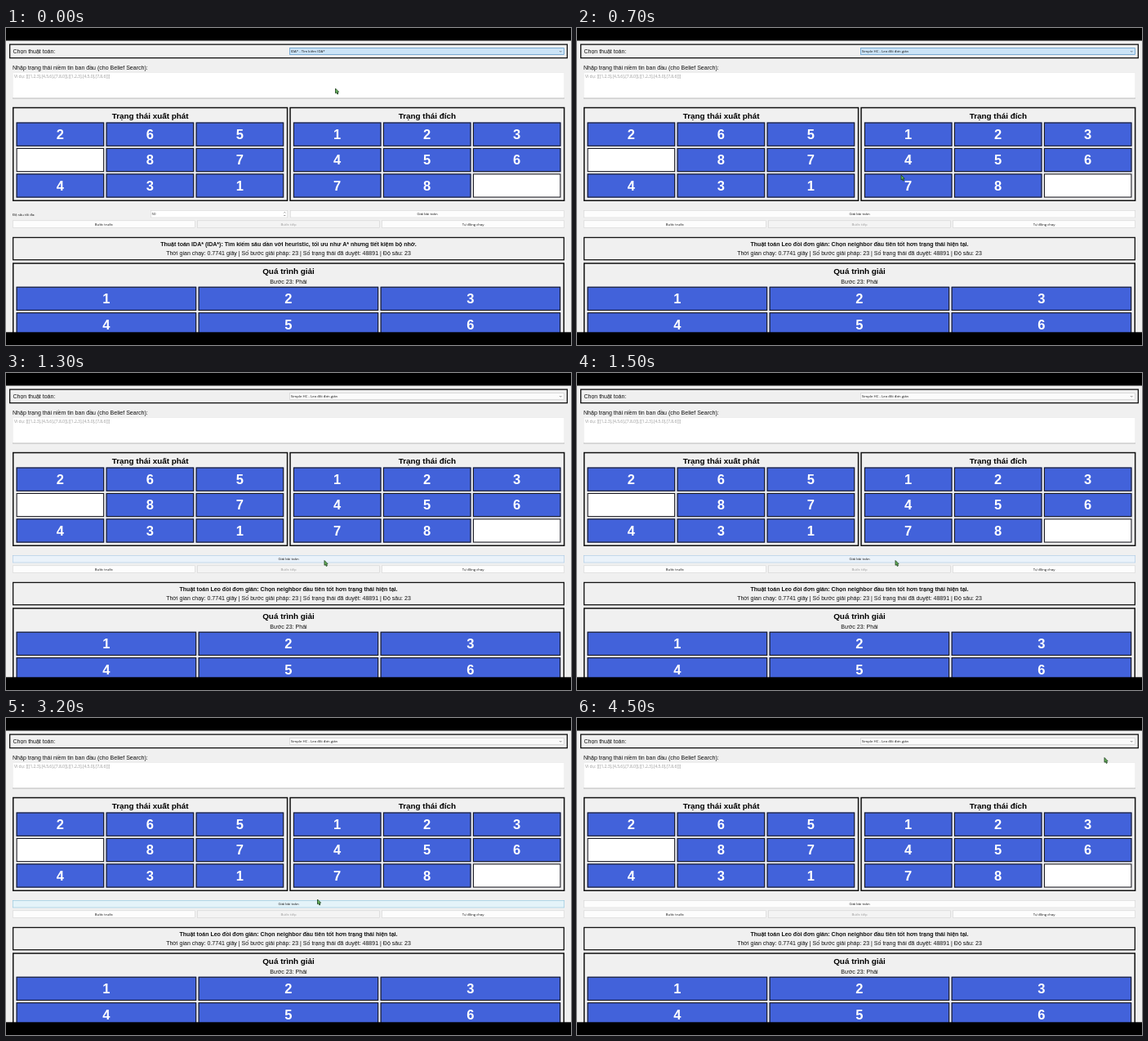
These frames come from a looping animation (692 px wide and 388 px high, 4.6 s). An HTML page with a canvas:

```html
<!DOCTYPE html>
<html lang="vi">
<head>
<meta charset="utf-8">
<style>
html, body { margin: 0; width: 100%; height: 100%; overflow: hidden; background: #000; }
canvas { display: block; width: 692px; height: 388px; }
</style>
</head>
<body>
<canvas id="stage"></canvas>
<script>
const LOOP = 4600, STEP = 100;
const W = 692, H = 388;
const BLUE = '#4262da', INK = '#111', PANEL = '#f0f0f0';
const SANS = '"Liberation Sans", Arial, sans-serif';
const UI = '"Open Sans", "Noto Sans", sans-serif';

const canvas = document.getElementById('stage');
const ctx = canvas.getContext('2d');
const scale = window.devicePixelRatio || 1;
canvas.width = W * scale;
canvas.height = H * scale;

// Pointer path: time, x, y
const path = [
  [0, 403.5, 74], [100, 407.5, 77], [500, 407.5, 77], [600, 405, 100], [700, 397, 180],
  [800, 390, 229.5], [1800, 390, 229.5], [2300, 373.5, 227.8], [2900, 373.5, 227.8],
  [3200, 381.5, 222], [3300, 392, 211], [3400, 410, 191], [3500, 433, 169],
  [3800, 535, 108], [4100, 622, 61], [4500, 646, 48.5], [4600, 646, 48.5]
];

function pointerAt(t) {
  const i = Math.max(1, path.findIndex(p => p[0] >= t));
  const [t0, x0, y0] = path[i - 1], [t1, x1, y1] = path[i];
  const k = (t - t0) / (t1 - t0);
  return [x0 + (x1 - x0) * k, y0 + (y1 - y0) * k];
}

function box(x, y, right, bottom, fill, stroke, line = 1) {
  ctx.fillStyle = fill;
  ctx.fillRect(x, y, right - x, bottom - y);
  if (!stroke) return;
  ctx.strokeStyle = stroke;
  ctx.lineWidth = line;
  ctx.strokeRect(x + line / 2, y + line / 2, right - x - line, bottom - y - line);
}

function text(str, x, y, font, color = INK, align = 'left') {
  ctx.font = font;
  ctx.fillStyle = color;
  ctx.textAlign = align;
  ctx.fillText(str, x, y);
}

const label = (str, x, y, align) => text(str, x, y, `7.04px ${SANS}`, INK, align);
const title = (str, x, y) => text(str, x, y, `bold 9.9px ${SANS}`, '#000', 'center');
const small = (str, x, y, color, align) => text(str, x, y, `4.3px ${UI}`, color, align);

function tiles(values, left, top, width, pitchX, pitchY) {
  [...values].forEach((v, i) => {
    const x = left + i % 3 * pitchX, y = top + Math.floor(i / 3) * pitchY;
    box(x, y, x + width, y + 29.3, v === '0' ? '#fff' : BLUE, '#1c1c24', 1.1);
    if (v !== '0') text(v, x + width / 2, y + 20.4, `bold 16.5px ${SANS}`, '#fff', 'center');
  });
}

function board(name, values, left, right) {
  box(left, 96.8, right, 212, PANEL, INK, 1.5);
  title(name, (left + right) / 2, 110.7);
  tiles(values, left + 4.6, 115.5, 107.6, 110, 31.4);
}

function button(str, left, right, y, { fill = '#fdfdfd', edge = '#d2d2d2', color = INK } = {}) {
  box(left, y, right, y + 9.3, fill, edge, 0.6);
  small(str, (left + right) / 2, y + 6.2, color, 'center');
}

function solveStyle(t) {
  if (t >= 800 && t < 1300) return { fill: '#e4f0f9', edge: '#86b4d6' };
  if (t >= 1300 && t < 1700) return { fill: '#eaf2fa', edge: '#a9c8e2' };
  if (t >= 3000 && t < 3300) return { fill: '#e4f3f9', edge: '#8fc3da' };
  return {};
}

function chevron(x, y, w, h) {
  ctx.beginPath();
  ctx.moveTo(x - w, y);
  ctx.lineTo(x, y + h);
  ctx.lineTo(x + w, y);
  ctx.strokeStyle = '#444';
  ctx.lineWidth = 0.6;
  ctx.stroke();
}

function chooser(t, deepening) {
  box(4, 19.5, 688, 37.3, PANEL, INK, 1.3);
  label('Chọn thuật toán:', 8.4, 31.3);
  const focused = t < 800;
  box(347, 24.3, 683.7, 32.8, focused ? '#cce4f7' : '#fbfbfb', focused ? '#5795c6' : '#cfcfcf', 0.7);
  small(deepening ? 'IDA* - Tìm kiếm IDA*' : 'Simple HC - Leo đồi đơn giản', 348.8, 30.2);
  chevron(679.3, 28, 1.3, 1.3);
}

function beliefInput() {
  label('Nhập trạng thái niềm tin ban đầu (cho Belief Search):', 8, 50.7);
  box(8, 54.5, 684, 86.3, '#fff', '#e6e6e6', 0.5);
  box(8, 85.7, 684, 86.4, '#a0a0a0');
  text('Ví dụ: [[[1,2,3],[4,5,6],[7,8,0]],[[1,2,3],[4,5,0],[7,8,6]]]',
    10, 61.2, `5.05px ${UI}`, '#999');
}

function controls(t, deepening) {
  if (deepening) {
    small('Độ sâu tối đa:', 8, 229.6);
    box(177, 223, 345, 232.3, '#fff', '#d2d2d2', 0.6);
    small('50', 178.6, 229.4);
    chevron(341.3, 226.4, 1, -1);
    chevron(341.3, 229, 1, 1);
  }
  button('Giải bài toán', deepening ? 348 : 8, 684, 223, solveStyle(t));
  button('Bước trước', 8, 231.7, 235.5);
  button('Bước tiếp', 234.3, 457.7, 235.5, { fill: '#f4f4f4', color: '#999' });
  button('Tự động chạy', 460.3, 684, 235.5);
}

function results(deepening) {
  box(8, 255.8, 684, 284.4, PANEL, INK, 1.3);
  const summary = deepening
    ? 'Thuật toán IDA* (IDA*): Tìm kiếm sâu dần với heuristic, tối ưu như A* nhưng tiết kiệm bộ nhớ.'
    : 'Thuật toán Leo đồi đơn giản: Chọn neighbor đầu tiên tốt hơn trạng thái hiện tại.';
  text(summary, 346, 267.2, `bold 7.04px ${SANS}`, INK, 'center');
  label('Thời gian chạy: 0.7741 giây | Số bước giải pháp: 23 | Số trạng thái đã duyệt: 48891 | Độ sâu: 23',
    346, 278.4, 'center');

  box(8, 287.3, 684, 400, PANEL, INK, 1.5);
  title('Quá trình giải', 346, 300.9);
  label('Bước 23: Phải', 346, 313.2, 'center');
  tiles('123456', 12.6, 316.7, 220.6, 223, 31.4);
}

function pointer(t) {
  const [x, y] = pointerAt(t);
  ctx.save();
  ctx.translate(x, y);
  if (t >= 100 && t < 700) {
    ctx.fillStyle = '#111';
    ctx.fillRect(0.1, 0.3, 0.9, 6);
    ctx.fillRect(-1.2, 0, 3.5, 0.7);
    ctx.fillRect(-1.2, 6, 3.5, 0.7);
  } else {
    ctx.beginPath();
    [[0, 0], [0, 5.8], [1.3, 4.8], [2.3, 7], [3.4, 6.5], [2.5, 4.4], [4.1, 4.2]]
      .forEach(p => ctx.lineTo(...p));
    ctx.closePath();
    ctx.fillStyle = '#69b95c';
    ctx.fill();
    ctx.strokeStyle = '#173b18';
    ctx.lineWidth = 0.8;
    ctx.stroke();
  }
  ctx.restore();
}

function draw(t) {
  const deepening = t < 200;
  ctx.setTransform(scale, 0, 0, scale, 0, 0);
  box(0, 0, W, H, PANEL);
  chooser(t, deepening);
  beliefInput();
  board('Trạng thái xuất phát', '265087431', 8, 345.3);
  board('Trạng thái đích', '123456780', 347.3, 684.4);
  controls(t, deepening);
  results(deepening);
  pointer(t);
  box(0, 0, W, 15.5, '#000');
  box(0, 372.3, W, H, '#000');
}

const start = performance.now();
function tick() {
  const t = (performance.now() - start) % LOOP;
  draw(Math.floor(t / STEP) * STEP);
  requestAnimationFrame(tick);
}
tick();
</script>
</body>
</html>
```
